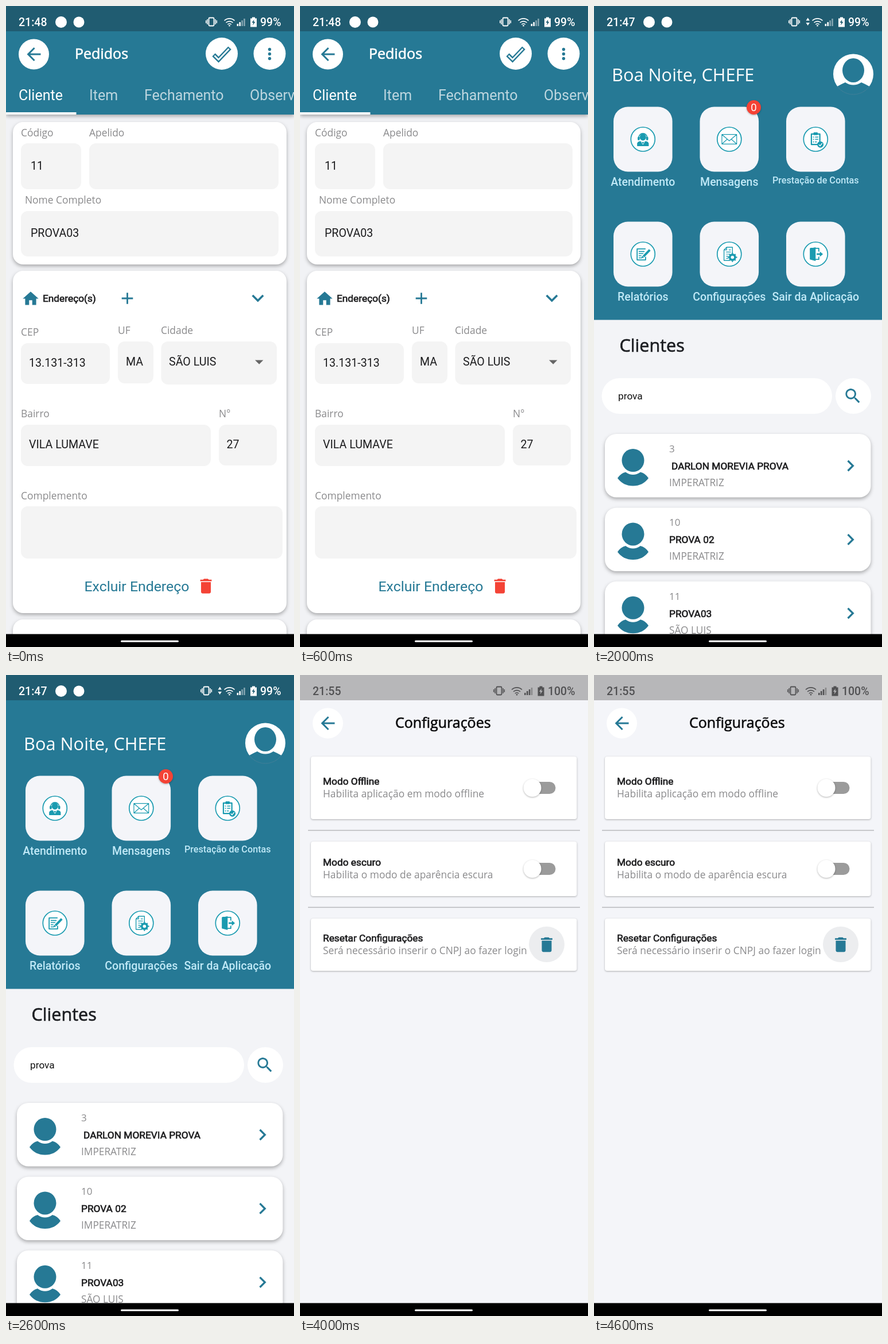
These frames come from a looping animation (502 by 1116 pixels, 5000 ms). An HTML page:

```html
<!DOCTYPE html>
<html lang="pt-BR">
<head>
<meta charset="utf-8">
<title>App de vendas</title>
<style>
html, body { margin: 0; width: 100%; height: 100%; overflow: hidden; background: #f4f5f9; }
svg { display: block; width: 100vw; height: 100vh; }
.r { font-family: Roboto, sans-serif; }
.o { font-family: "Open Sans", "Noto Sans", sans-serif; }
.b { stroke: currentColor; stroke-width: .65px; }
.m { font-weight: 500; }
.soft { filter: drop-shadow(0 3px 3px rgba(0,0,0,.3)); }
.side { filter: drop-shadow(4px 4px 4px rgba(0,0,0,.2)); }
.flat { filter: drop-shadow(0 1.5px 1.5px rgba(0,0,0,.3)); }
</style>
</head>
<body>
<svg id="stage" viewBox="0 0 502 1116" xmlns="http://www.w3.org/2000/svg"></svg>
<script>
const TEAL = '#267995', PAGE = '#f4f5f9', GREY = '#8a8a8c', CYAN = '#1a9bb0', RED = '#f44336';

const ICON = {
  back: 'M20 11H7.83l5.59-5.59L12 4l-8 8 8 8 1.41-1.41L7.83 13H20z',
  home: 'M10 20v-6h4v6h5v-8h3L12 3 2 12h3v8z',
  add: 'M19 13h-6v6h-2v-6H5v-2h6V5h2v6h6z',
  down: 'M16.59 8.59L12 13.17 7.41 8.59 6 10l6 6 6-6z',
  next: 'M10 6L8.59 7.41 13.17 12l-4.58 4.59L10 18l6-6z',
  bin: 'M6 19c0 1.1.9 2 2 2h8c1.1 0 2-.9 2-2V7H6zM19 4h-3.5l-1-1h-5l-1 1H5v2h14z',
  find: 'M15.5 14h-.79l-.28-.27A6.5 6.5 0 1 0 13.73 14.43l.27.28v.79l5 4.99L20.49 19zM9.5 14a4.5 4.5 0 1 1 0-9 4.5 4.5 0 0 1 0 9z',
  doc: 'M8 16h8v2H8zM8 12h8v2H8zM14 2H6a2 2 0 0 0-2 2v16a2 2 0 0 0 2 2h12a2 2 0 0 0 2-2V8zM18 20H6V4h7v5h5z',
  lines: 'M7 7h10v2H7zM7 11h10v2H7zM7 15h7v2H7z',
  bars: 'M7 10h2v7H7zM11 7h2v10h-2zM15 13h2v4h-2z',
  badge: 'M12 6a3 3 0 1 0 0 6 3 3 0 0 0 0-6zM12 10a1 1 0 1 1 0-2 1 1 0 0 1 0 2zM18 16.58c0-2.5-3.97-3.58-6-3.58s-6 1.08-6 3.58V18h12zM8.48 16c.74-.51 2.23-1 3.52-1s2.78.49 3.52 1z',
  sums: 'M4 19L19 4l1 1L5 20zM5.7 7h5.2v1.4H5.7zM14.4 12.7h1.5v2.1H18v1.5h-2.1v2.1h-1.5v-2.1h-2.1v-1.5h2.1z'
};

const rect = (x, y, w, h, r, fill, more = '') =>
  `<rect x="${x}" y="${y}" width="${w}" height="${h}" rx="${r}" fill="${fill}" ${more}/>`;
const disc = (x, y, r, fill, more = '') => `<circle cx="${x}" cy="${y}" r="${r}" fill="${fill}" ${more}/>`;
const path = (d, fill, more = '') => `<path d="${d}" fill="${fill}" ${more}/>`;
const line = (d, color, w, more = '') => path(d, 'none', `stroke="${color}" stroke-width="${w}" ${more}`);
const text = (s, x, y, size, fill, cls = 'r', anchor = 'start') =>
  `<text x="${x}" y="${y}" font-size="${size}" fill="${fill}" color="${fill}" class="${cls}" text-anchor="${anchor}">${s}</text>`;
const at = (x, y, s, body) => `<g transform="translate(${x} ${y}) scale(${s})">${body}</g>`;
const icon = (name, x, y, s, fill = TEAL) =>
  at(x, y, s, path(ICON[name], fill, 'fill-rule="evenodd" transform="translate(-12 -12)"'));
const card = (x, y, w, h, r, cls) => rect(x, y, w, h, r, '#fff', `class="${cls}"`);
const label = (s, x, y) => text(s, x, y, 17.4, GREY, 'o');
const strong = (s, x, y) => text(s, x, y, 17.3, '#1c1c1e', 'r b');
const value = (s, x, y) => text(s, x, y, 19.6, '#1c1c1e');
const title = (s, x, fill = '#0c0c0e') => text(s, x, 92, 25, fill, 'o b');
const backButton = () => disc(48.5, 84, 26.5, '#fff') + icon('back', 48.5, 84, 1.5);

function statusBar(bg, ink, time, { dx = 0, data = false, full = false, apps = true } = {}) {
  let s = rect(0, 0, 502, 44, 0, bg) + text(time, 22, 35, 19.5, ink, 'r m');
  if (apps) s += disc(96, 28, 10, ink) + disc(127, 28, 9.5, ink);
  const vx = 358 + dx - (data ? 9 : 0);
  s += rect(vx - 4.5, 20.5, 9, 14, 1.5, 'none', `stroke="${ink}" stroke-width="1.8"`);
  s += line(`M${vx - 7} 23v9M${vx + 7} 23v9M${vx - 9.3} 25v5M${vx + 9.3} 25v5`, ink, 1.5);
  if (data) s += path('M369.5 25.5l3.2-5 3.2 5zM369.5 29l3.2 5 3.2-5z', ink);
  const k = full ? -11.5 : 0;
  s += at(389.5 + k, 35, 1,
    line('M-9 -9.5a13 13 0 0 1 18 0M-6 -6a8.8 8.8 0 0 1 12 0M-3.2 -2.8a4.6 4.6 0 0 1 6.4 0', ink, 1.6) + disc(0, -.8, 1.3, ink));
  for (let i = 0; i < 4; i++) {
    const h = 4 + i * 3;
    s += rect(402.5 + k + i * 3.9, 35 - h, 2.6, h, .5, ink, `opacity="${i < (full ? 3 : 2) ? 1 : .45}"`);
  }
  s += at(431.5 + k, 28, 1, path('M-2.5 -8.5h5v2h3v15h-11v-15h3z', ink) + path('M1 -4.5l-4 5.5h2.5l-.8 4.5 4.3-6H.3z', bg));
  return s + text(full ? '100%' : '99%', 479.5, 35, 19.5, ink, 'r m', 'end');
}

const navBar = (bg = '#000') => rect(0, 1093.5, 502, 23, 0, bg) + rect(200, 1104.4, 101, 3, 1.5, '#fff');

function orderForm() {
  const field = (x, y, w, h) => rect(x, y, w, h, 12, '#f4f4f4');
  let s = rect(0, 0, 502, 1116, 0, '#f1f2f5') + rect(0, 40, 502, 149, 0, TEAL, 'class="soft"');
  s += statusBar('#205c71', '#fff', '21:48') + backButton() + title('Pedidos', 120, '#fff');
  s += disc(376, 83, 28, '#fff') + disc(459.5, 83, 28, '#fff');
  const tick = 'M362 85l8.5 8.5L390 73';
  s += line(tick, TEAL, 7.5) + line('M363.5 86.5l7 7 18-19', '#fff', 2.6);
  for (const y of [75.5, 83.5, 91.5]) s += disc(459.5, y, 2.7, TEAL);
  [['Cliente', 22], ['Item', 145], ['Fechamento', 241], ['Observação', 425]].forEach(([t, x], i) => {
    s += text(t, x, 163.5, 25, i ? '#bdd6df' : '#fff');
  });
  s += rect(0, 185, 122.5, 4, 0, '#fff');

  s += card(12, 202, 477, 248, 18, 'soft');
  s += label('Código', 26, 227) + label('Apelido', 145, 227) + label('Nome Completo', 33, 344);
  s += field(26, 239, 105, 80) + field(145, 239, 330, 80) + field(26, 357, 449, 79);
  s += value('11', 43, 285) + value('PROVA03', 43, 402);

  s += card(12, 461, 477, 596, 18, 'soft');
  s += icon('home', 43, 509.5, 1.37) + strong('Endereço(s)', 64, 515);
  s += icon('add', 211.5, 509, 1.4) + icon('down', 439, 508.5, 1.75);
  s += label('CEP', 26, 574) + label('UF', 195, 571) + label('Cidade', 270, 571);
  s += field(26, 587, 155, 71) + field(195, 584, 62, 73) + field(270.5, 584, 201.5, 75);
  s += value('13.131-313', 40, 628) + value('MA', 209, 626) + value('SÃO LUIS', 284, 626);
  s += path('M434 616.5h14.5l-7.2 7.2z', '#666');
  s += label('Bairro', 26, 716) + label('N°', 371, 716) + label('Complemento', 26, 859);
  s += field(26, 729, 331, 72) + field(371, 729, 101, 71) + field(26, 871, 456, 91);
  s += value('VILA LUMAVE', 40, 770) + value('27', 384.5, 770);
  s += text('Excluir Endereço', 136.5, 1019, 24.8, TEAL) + icon('bin', 348.5, 1010, 1.42, RED);
  return s + card(12, 1068, 477, 60, 18, 'soft') + navBar();
}

function reports() {
  const frame = rect(4, 4, 16, 16, 1, 'none', `stroke="${TEAL}" stroke-width="2"`);
  const clip = disc(12, 4, 2.9, TEAL) + disc(12, 3.7, .8, '#fff');
  const items = [
    ['Acompanhamento', 'lines'], ['Faturamento', 'bars'],
    ['Financeiro', 'lines'], ['Sup Vendas', 'lines', 1],
    ['RH', 'badge', 1], ['Fiscal', 'sums']
  ];
  let s = rect(0, 0, 502, 1116, 0, PAGE) + statusBar('#b7b7b9', '#515153', '21:47', { data: true });
  s += backButton() + title('Relatórios', 191.5);
  items.forEach(([name, kind, clipped], i) => {
    const x = 21 + i % 2 * 244, y = 129 + (i >> 1) * 268.4;
    s += card(x, y, 216, 241, 36, 'side');
    s += at(x + 24, y + 18.5, 3.5, frame + (clipped ? clip : '') + path(ICON[kind], TEAL, 'fill-rule="evenodd"'));
    s += strong(name, x + 14, y + 140.5) + icon('next', x + 181, y + 202, 1.65);
  });
  return s + navBar();
}

// Small drawings inside the 42 px menu rings, centred on 0,0.
function menuArt() {
  const fill = d => path(d, CYAN, 'fill-rule="evenodd"');
  const thin = (d, w = 1.5) => line(d, CYAN, w, 'stroke-linejoin="round"');
  const rows = thin('M-8 -5h11M-8 -1h10M-8 3h8M-8 7h6', 1.7);
  return [
    fill('M-6 -4a6 6.5 0 0 1 12 0c0 4-3 6.5-6 6.5s-6-2.500-6-6.500zM-11 13v-5q1-4 6-4.500q5 4 10 0q5 .5 6 4.500v5z') +
      thin('M-8 -3a8 8 0 0 1 16 0', 1.8) + rect(-10, -5, 4, 7, 2, CYAN) + rect(6, -5, 4, 7, 2, CYAN) + line('M-3 5l3 5 3-5', '#fff', 1),
    thin('M-14 -9h28v18h-28zM-14 -9L0 3 14 -9M-14 9L-4 0M14 9L4 0', 1.3),
    thin('M-8 -10h16v20h-16z', 2.4) + rect(-4, -13, 8, 5, 1, CYAN) +
      thin('M-5 -4h2M-1 -4h6M-5 0h2M-1 0h6M-5 5h2M-1 5h3', 1.7) + disc(9, 10, 6, CYAN) + line('M6 10l2.500 2.500L12.500 7.500', '#fff', 1.5),
    thin('M5 -10h-16v21h16v-6', 2) + rows + line('M-1 6L12 -8', '#fff', 7) + thin('M1 4.500L13 -8', 4.200) + fill('M-3 8l1.500-5 3.500 3.500z'),
    thin('M6 -1v-12h-11l-5 5v20h11M-5 -13v5h-5', 1.5) + thin('M-6 -4h9M-6 0h8M-6 4h5M-6 8h5M-1 -8h4', 1.3) +
      disc(6, 6, 7.500, CYAN, 'stroke="#fff"') + disc(6, 6, 3, '#fff') +
      thin('M6 -3v3M6 12v3M-3 6h3M12 6h3M0 0l2 2M10 10l2 2M12 0l-2 2M2 10l-2 2', 2),
    fill('M-11 -11l11-2v26l-11-3z') + thin('M-10 -11h16v6M6 5v5h-7', 2) + thin('M2 0h8', 3) + fill('M8 -5l6 5-6 5z')
  ];
}

function home() {
  const menu = ['Atendimento', 'Mensagens', 'Prestação de Contas', 'Relatórios', 'Configurações', 'Sair da Aplicação'];
  const art = menuArt();
  let s = rect(0, 0, 502, 1116, 0, '#f3f4f7') + rect(0, 0, 502, 546.5, 0, TEAL);
  s += statusBar('#205c71', '#fff', '21:47', { data: true });
  s += text('Boa Noite, CHEFE', 31, 131, 30.7, '#fff', 'o');
  s += disc(452, 118.500, 35, '#fff') + `<ellipse cx="452" cy="112" rx="19" ry="21" fill="${TEAL}"/>`;
  s += path('M424 140q7-4 14-7q14 9 28 0q7 3 14 7a35 35 0 0 1-56 0z', TEAL);
  s += line('M424 140a35 35 0 0 0 56 0', '#3f7f98', 1);
  menu.forEach((name, i) => {
    const x = 85.3 + i % 3 * 150.5, y = 175.5 + (i > 2) * 200, small = i === 2;
    s += rect(x - 51.3, y, 102.6, 113, 25, PAGE);
    s += disc(x, y + 56.500, 21, '#fff', `stroke="${CYAN}" stroke-width="1.7"`) + at(x, y + 56.500, .92, art[i]);
    s += text(name, x, y + (small ? 133.5 : 137), small ? 16.2 : 19.500, '#c0e9f7', 'r m', 'middle');
  });
  s += disc(278.5, 176.5, 12.5, RED, 'class="flat"') + text('0', 278.5, 183, 18.5, '#fff', 'r', 'middle');

  s += text('Clientes', 44.5, 602, 30.6, '#1c1e22', 'o b');
  s += rect(13.5, 648, 401.5, 62, 31, '#fff') + text('prova', 42, 684.5, 17.3, '#111');
  s += disc(452, 679, 31, '#fff') + icon('find', 451.2, 679, 1.43);
  const people = [['3', 'DARLON MOREVIA PROVA', 'IMPERATRIZ', 4], ['10', 'PROVA 02', 'IMPERATRIZ', 0], ['11', 'PROVA03', 'SÃO LUIS', 0]];
  people.forEach(([id, name, city, indent], i) => {
    const y = 745 + i * 128.4;
    s += card(19, y, 463.5, 110.5, 20, 'soft');
    s += `<ellipse cx="68" cy="${y + 46}" rx="19.5" ry="20" fill="${TEAL}"/>`;
    s += at(68, y, 1, path('M-27 77q5-8 14-10.500q13 9 26 0q9 2.500 14 10.500q-10 13.500-27 13.500t-27-13.500z', TEAL));
    s += text(id, 131, y + 32, 17, GREY, 'o') + strong(name, 131 + indent, y + 61.7);
    s += text(city, 131, y + 91, 17.3, GREY, 'o') + icon('next', 447, y + 55.5, 1.65);
  });
  return s + navBar();
}

function openWith() {
  const ink = '#0b0b0c', dim = '#38383a', rule = '#4b4b4d', blue = '#4485f4';
  let s = rect(0, 0, 502, 1116, 0, '#616264') + statusBar('#4a4a4b', '#fff', '21:48');
  s += disc(48.5, 84, 26.5, '#656566') + icon('back', 48.5, 84, 1.5, '#0f3645') + title('Lista de Pedidos', 155);
  const orders = [['236', '26/04/2021', 'Bonificação', '2,85'], ['238', '07/05/2021', 'Bonificação', '2,74'], ['240', '27/05/2021', 'Orçamento', '']];
  orders.forEach(([id, date, kind, total], i) => {
    const right = (t, y) => text(t, 358, y, 19.500, ink, 'r', 'end');
    let row = rect(25, 124, 452, 168, 22, '#656566');
    row += text(`N°: ${id}`, 53, 184.7, 19.500, ink) + disc(140, 178, 10.5, '#2f5b57') + right(date, 184.7);
    row += line('M53 197H359M366.500 154V266', rule, 3);
    row += text('Status:', 53, 222, 17.4, dim, 'o') + text('Total:', 53, 249, 17.4, dim, 'o');
    row += right(kind, 222) + right(total, 249.5) + icon('doc', 418, 211, 1.47, '#113b4b');
    s += at(0, i * 175.8, 1, row);
  });
  s += rect(0, 567, 502, 560, 9, '#3b3e40');
  s += disc(44.500, 614, 20.5, '#b30b00') + text('Abrir com Lumba Folhara', 89, 615.5, 22, '#fff', 'r m');
  s += text('Só uma vez', 257.5, 726, 19.4, blue, 'r m') + text('Sempre', 392, 726, 19.4, blue, 'r m');
  s += rect(0, 768, 502, 1, 0, '#5d5f61') + text('Usar outro app', 33, 818, 22, '#fff', 'r m');
  [['Cofre', 892, 897, '#fff'], ['Zelbo', 983, 975, '#ff7a00'], ['QZ', 1061, 1053, '#f8ec3f']].forEach(([name, y, cy, color]) => {
    s += disc(44.500, cy, 20.5, color) + text(name, 89, y, 21.7, '#f4f4f4');
  });
  return s + text('Visualizador de PDF do Cofre', 89, 919, 19.500, '#b4b6b8') + navBar('#242628');
}

function settings() {
  const toggle = y => rect(398, y - 10.5, 47.5, 21, 10.5, '#9b9b9b') + disc(405, y, 15.5, '#fff', 'class="flat"');
  const option = (y, h, dy, name, hint) =>
    card(19, y, 463.5, h, 4, 'flat') + strong(name, 40, y + dy) + label(hint, 40, y + dy + 22);
  let s = rect(0, 0, 502, 1116, 0, PAGE) + statusBar('#b7b7b9', '#515153', '21:55', { dx: -11, full: true, apps: false });
  s += backButton() + title('Configurações', 166);
  s += option(142, 109, 49, 'Modo Offline', 'Habilita aplicação em modo offline');
  s += option(290, 95, 42, 'Modo escuro', 'Habilita o modo de aparência escura');
  s += option(424, 91, 39.5, 'Resetar Configurações', 'Será necessário inserir o CNPJ ao fazer login');
  s += line('M14 270.500H488M14 404.500H488', '#b6b7ba', 1.3);
  s += toggle(196.5) + toggle(337.5) + disc(430, 469, 31, '#ecedef') + icon('bin', 430, 469.5, 1.42);
  return s + navBar();
}

const stage = document.getElementById('stage');
const HOLD = 1000;
stage.innerHTML = [orderForm, reports, home, openWith, settings].map(draw => `<g display="none">${draw()}</g>`).join('');
const screens = [...stage.children];
const start = performance.now();

function update() {
  const now = Math.floor((performance.now() - start) / HOLD) % screens.length;
  screens.forEach((g, i) => g.setAttribute('display', i === now ? 'inline' : 'none'));
  requestAnimationFrame(update);
}
update();
</script>
</body>
</html>
```
